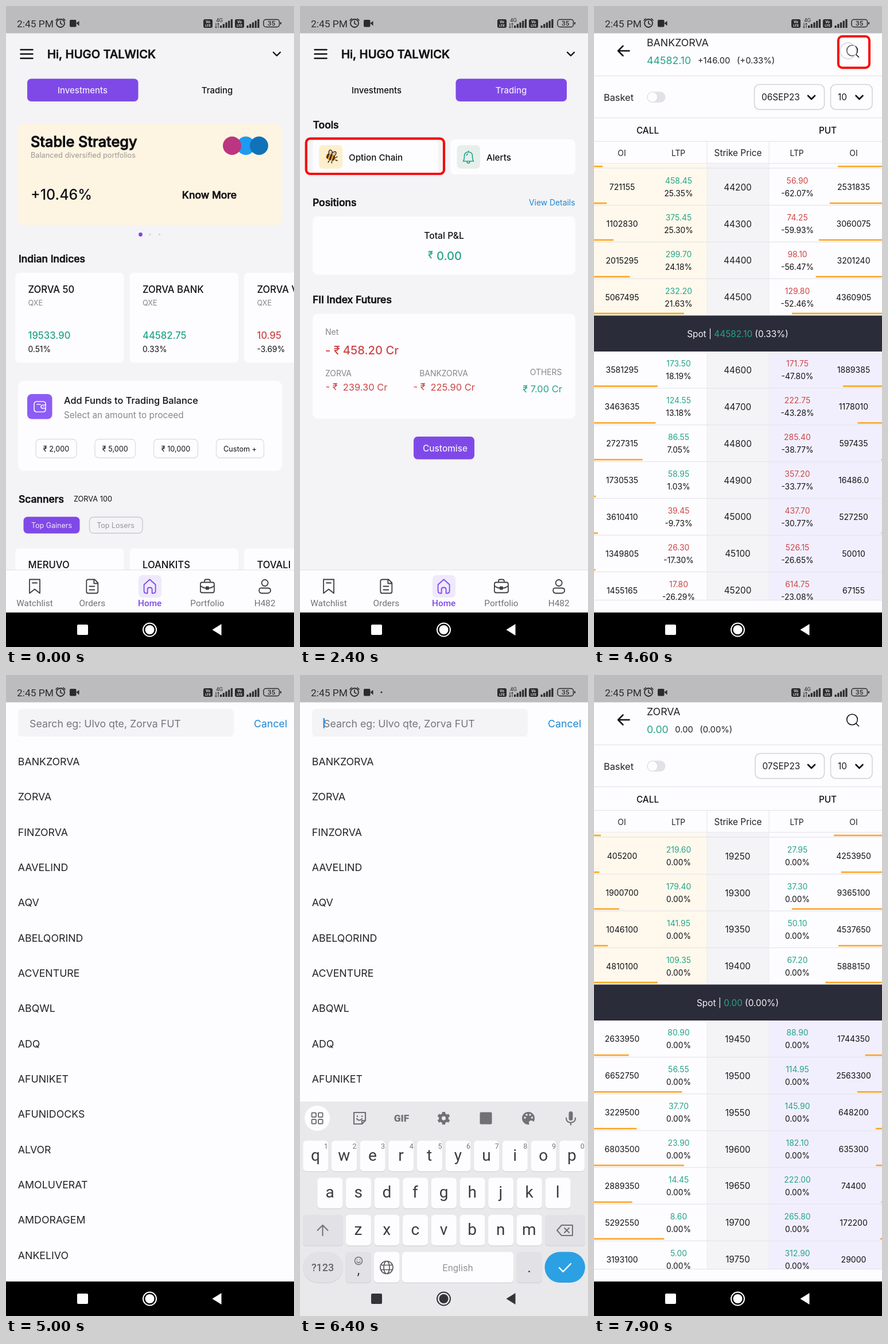
These frames come from a looping animation (502 px wide and 1115 px high, 8 s). An HTML page with a canvas:

```html
<!DOCTYPE html>
<html lang="en">
<head>
<meta charset="utf-8">
<title>Option chain walkthrough</title>
<style>
html, body { margin: 0; width: 100%; height: 100%; overflow: hidden; background: #fdfcfe; }
canvas { display: block; width: 502px; height: 1115px; }
</style>
</head>
<body>
<canvas id="stage"></canvas>
<script>
const W = 502, H = 1115, LOOP = 8000, STEP = 100;
const cv = document.getElementById('stage');
const g = cv.getContext('2d');
const dpr = window.devicePixelRatio || 1;
cv.width = W * dpr;
cv.height = H * dpr;

const SP = 1.278;
const INTER = 'Inter, sans-serif', ROBOTO = 'Roboto, sans-serif';
const INK = '#111114', PAPER = '#fdfcfe', MIST = '#f4f3f6', GREY = '#87868b';
const PURPLE = '#7f49e8', GREEN = '#25a388', RED = '#cd4646', BLUE = '#1b88d4';
const ALERT = '#f50a0a', LINE = '#e5e4e9', AMBER = '#fba622';

// ---------- helpers ----------
// y is the middle of the capitals; weight 'b' thickens the medium face
function text(s, x, y, size, color = INK, align = 'left', weight = 400, face = INTER) {
  const px = size * SP;
  g.font = `${weight === 'b' ? 500 : weight} ${px}px ${face}`;
  g.textAlign = align;
  g.fillStyle = color;
  g.fillText(s, x, y + px * 0.364);
  if (weight === 'b') {
    g.strokeStyle = color;
    g.lineWidth = px * 0.035;
    g.strokeText(s, x, y + px * 0.364);
  }
}
function rect(x0, y0, x1, y1, fill) {
  g.fillStyle = fill;
  g.fillRect(x0, y0, x1 - x0, y1 - y0);
}
function box(x0, y0, x1, y1, r, fill, stroke, lw = 1.3) {
  g.beginPath();
  g.roundRect(x0, y0, x1 - x0, y1 - y0, r);
  if (fill) { g.fillStyle = fill; g.fill(); }
  if (stroke) { g.strokeStyle = stroke; g.lineWidth = lw; g.stroke(); }
}
function disc(x, y, r, fill, stroke, lw = 1.5) {
  g.beginPath();
  g.arc(x, y, r, 0, Math.PI * 2);
  if (fill) { g.fillStyle = fill; g.fill(); }
  if (stroke) { g.strokeStyle = stroke; g.lineWidth = lw; g.stroke(); }
}
function icon(d, x, y, color, lw = 2, fill = false) {
  g.save();
  g.translate(x, y);
  g.lineCap = g.lineJoin = 'round';
  g.strokeStyle = g.fillStyle = color;
  g.lineWidth = lw;
  const p = new Path2D(d);
  if (fill) g.fill(p); else g.stroke(p);
  g.restore();
}
function clipped(x0, y0, x1, y1, draw) {
  g.save();
  g.beginPath();
  g.rect(x0, y0, x1 - x0, y1 - y0);
  g.clip();
  draw();
  g.restore();
}
const hline = y => rect(0, y - 0.6, W, y + 0.6, LINE);
const clamp = u => Math.min(1, Math.max(0, u));
const smooth = u => u * u * (3 - 2 * u);

// ---------- system bars ----------
function volte(x) {
  box(x, 23, x + 16, 38, 3, '#2b2b2d');
  text('Vo', x + 8, 27.5, 5, '#ddd', 'center', 700, ROBOTO);
  text('LTE', x + 8, 34, 4.7, '#ddd', 'center', 700, ROBOTO);
}
function signal(x, n) {
  for (let i = 0; i < n; i++) {
    const h = 4 + i * 11 / (n - 1);
    rect(x + i * 4.7, 38 - h, x + i * 4.7 + 3.2, 38, '#2b2b2d');
  }
}
function statusBar(t) {
  rect(0, 0, W, 47.5, '#bcbbbd');
  const c = '#2b2b2d';
  text('2:45 PM', 19, 30.5, 13.6, c, 'left', 400, ROBOTO);
  disc(95, 30, 7, null, c, 1.8);
  icon('M0-4V0.500L3 2M-8-5L-5-8M8-5L5-8', 95, 30, c, 1.7);
  box(111, 24, 122.5, 36.5, 2, c);
  icon('M0 0L5-4V4.500Z', 122.5, 30, c, 1, true);
  if (t >= 5900 && t < 7500) disc(142, 30, 1.5, c);
  volte(344);
  text('4G', 372, 25, 7.4, c, 'center', 400, ROBOTO);
  icon('M0-5V3M-1.500 1.500L0 3 1.500 1.500M4 3V-5M2.500-3.500L4-5 5.500-3.500', 366, 35, c, 1);
  signal(373, 5);
  volte(399);
  signal(419.5, 5);
  box(449, 23.5, 476.5, 36.5, 4, null, c, 1.5);
  box(478, 28, 480, 32, 1, c);
  text('35', 462.8, 30, 9.2, c, 'center', 500, ROBOTO);
}
function navIcons(color) {
  box(124, 1076, 143, 1094, 2, color);
  disc(250.5, 1085, 11.5, null, color, 2);
  disc(250.5, 1085, 8, color);
  icon('M0 0L16-10V10Z', 359.5, 1085, color, 1, true);
}
function navBar() {
  rect(0, 1055, W, H, '#000');
  navIcons('#fff');
}

// ---------- home ----------
const TABS = [
  ['Watchlist', 'M-9-12H9V12L0 5-9 12ZM-4-6H4'],
  ['Orders', 'M-6-12H4L10-6V9Q10 12 7 12H-7Q-10 12-10 9V-9Q-10-12-6-12ZM3-12V-5H10M-5 0H4M-5 6H4'],
  ['Home', 'M-10-3L0-12 10-3V8Q10 12 6 12H4V5Q4 2 0 2T-4 5V12H-6Q-10 12-10 8Z'],
  ['Portfolio', 'M-9-7H9Q12-7 12-4V8Q12 11 9 11H-9Q-12 11-12 8V-4Q-12-7-9-7ZM-5-7V-9Q-5-12-2-12H2Q5-12 5-9V-7M-12-1Q-7 3-3 3H3Q7 3 12-1M-2 1H2V5H-2Z'],
  ['H482', 'M-5.500-6a5.500 5.500 0 1 0 11 0a5.500 5.500 0 1 0-11 0M-5 3H5Q10 3 10 7T5 12H-5Q-10 12-10 7T-5 3Z']
];
function tabBar() {
  rect(0, 981, W, 1055, PAPER);
  hline(981);
  box(231, 990, 271, 1029, 7, '#efe9fc');
  TABS.forEach(([name, d], i) => {
    const x = 50 + i * 100.3, on = i === 2;
    icon(d, x, 1009.5, on ? PURPLE : '#3e3e42', 1.8);
    text(name, x, 1038, 12, on ? PURPLE : '#727176', 'center', on ? 500 : 400, ROBOTO);
  });
}
function homeTop(trading) {
  rect(0, 47, W, 1055, MIST);
  icon('M1-7.500H22M1 0H22M1 7.500H22', 24.5, 83.5, INK, 2.5);
  text('Hi, HUGO TALWICK', 72, 84, 15.8, INK, 'left', 'b');
  icon('M-6-3L0 3 6-3', 472, 83.5, INK, 2.4);
  const x = trading ? 271.5 : 37;
  box(x, 126.5, x + 193.5, 166, 7, PURPLE);
  text('Investments', 133.5, 147, 11.7, trading ? INK : '#f1eafd', 'center', 500);
  text('Trading', 368, 147, 11.7, trading ? '#f1eafd' : INK, 'center', 500);
}
function indexCard(i, name, value, pct) {
  const x = 16 + i * 199.5;
  box(x, 464, x + 189.5, 620.5, 7, PAPER);
  text(name, x + 22.5, 492.5, 13, INK, 'left', 500);
  text('QXE', x + 22.5, 516, 10, GREY);
  text(value, x + 22.5, 573, 13, pct[0] === '-' ? RED : GREEN, 'left', 500);
  text(pct, x + 22.5, 596.5, 10.8);
}
function investments() {
  homeTop(false);
  box(21, 204, 481.5, 381, 11, '#fef4e2');
  text('Stable Strategy', 43, 235.5, 19.8, '#0c0c0e', 'left', 'b');
  text('Balanced diversified portfolios', 43, 259, 10, '#9b9793');
  disc(418, 243, 16, '#1d9bf0');
  disc(441, 243, 16, '#1072b8');
  disc(394, 243, 16, '#bb3680');
  text('+10.46%', 43, 328, 19.6, INK, 'left', 500);
  text('Know More', 354.5, 329, 13.7, INK, 'center', 'b');
  disc(234.5, 397.5, 3.4, PURPLE);
  disc(251, 397.5, 1.8, '#d9d0ef');
  disc(267.5, 397.5, 1.8, '#d9d0ef');
  text('Indian Indices', 22, 440, 13.7, INK, 'left', 'b');
  indexCard(0, 'ZORVA 50', '19533.90', '0.51%');
  indexCard(1, 'ZORVA BANK', '44582.75', '0.33%');
  indexCard(2, 'ZORVA VOL', '10.95', '-3.69%');

  box(21, 652, 481.5, 808.5, 11, PAPER);
  box(37, 675, 80.5, 718.5, 8, '#8c5cf5');
  icon('M-5-9H5Q10-9 10-5V-3H6Q2-3 2 0T6 3H10V5Q10 9 5 9H-5Q-10 9-10 4V-4Q-10-9-5-9ZM-5-4H1M10-3V3M6 0H7', 59, 697, '#f6f0ff', 1.7);
  text('Add Funds to Trading Balance', 101, 686, 12.8, INK, 'left', 500);
  text('Select an amount to proceed', 101, 711, 12, GREY);
  [[52, 123, '₹ 2,000'], [155, 225.5, '₹ 5,000'], [257.5, 334.5, '₹ 10,000'], [366.5, 449.5, 'Custom +']].forEach(([a, b, s]) => {
    box(a, 753.5, b, 786, 7, null, '#dedde2');
    text(s, (a + b) / 2, 770.5, 9.9, INK, 'center');
  });

  text('Scanners', 22, 857.5, 13.7, INK, 'left', 'b');
  text('ZORVA 100', 118, 857, 10);
  box(30.5, 888.5, 128.5, 917.5, 7, PURPLE);
  text('Top Gainers', 79.5, 903.5, 9.8, '#f1eafd', 'center');
  box(145.5, 889, 238, 917, 7, null, '#cac9ce');
  text('Top Losers', 191, 903.5, 9.8, '#96959a', 'center');
  ['MERUVO', 'LOANKITS', 'TOVALI'].forEach((s, i) => {
    const x = 16 + i * 199.5;
    box(x, 943.5, x + 189.5, 1040, 7, PAPER);
    text(s, x + 22.5, 971.5, 13, INK, 'left', 500);
  });
  tabBar();
}
function bee(x, y) {
  g.save();
  g.translate(x, y);
  g.rotate(0.35);
  for (const [dx, a] of [[-3, -0.5], [3, 0.4]]) {
    g.beginPath();
    g.ellipse(dx, -6, 3.2, 5, a, 0, 7);
    g.fillStyle = '#d8c7b4';
    g.fill();
    g.strokeStyle = '#33241c';
    g.lineWidth = 1.3;
    g.stroke();
  }
  g.beginPath();
  g.ellipse(0, 1, 9, 5.5, 0, 0, 7);
  g.fillStyle = '#eda02b';
  g.fill();
  g.clip();
  for (const dx of [-7, -1.5, 4]) rect(dx, -6, dx + 2.8, 8, '#33241c');
  g.restore();
  icon('M-3 7L-5 10M2 8L1 11M8 2L11 0M8 6L11 7', x, y, '#33241c', 1.4);
}
// minus and currency sign start at x0, the amount ends at x1
function loss(amount, x0, x1, y, size, weight) {
  text('- ₹', x0, y - 0.5, size, RED, 'left', weight);
  text(amount, x1, y, size, RED, 'right', weight);
}
function trading(t) {
  homeTop(true);
  text('Tools', 22.5, 206.5, 13.7, INK, 'left', 'b');
  box(22, 232, 241, 293, 8, PAPER);
  box(262, 232, 480, 293, 8, PAPER);
  box(33, 242, 74, 283, 7, '#feefcc');
  bee(54, 262);
  text('Option Chain', 85, 263, 11.9, INK, 'left', 500);
  box(273.5, 242, 314, 283, 7, '#e7efeb');
  icon('M-9 7Q-7 4-7-2Q-7-9 0-9T7-2Q7 4 9 7ZM-2.500 7Q-2.500 10.500 0 10.500T2.500 7M0-9V-11M-3-3Q-3-5-1-6', 293.5, 263, GREEN, 1.6);
  text('Alerts', 325, 263, 11.9, INK, 'left', 500);
  if (t >= 2000) box(10.7, 230.7, 251, 292, 7, null, ALERT, 4.2);

  text('Positions', 22, 341.5, 13.7, INK, 'left', 'b');
  text('View Details', 479.5, 341.5, 10.85, BLUE, 'right');
  box(22, 366, 480, 467.5, 9, PAPER);
  text('Total P&L', 251, 399.5, 12.3, INK, 'center', 500);
  text('₹', 223, 433, 13, GREEN, 'left', 500);
  text('0.00', 238, 434.5, 15.8, GREEN, 'left', 500);

  text('FII Index Futures', 22, 511, 13.7, INK, 'left', 'b');
  box(22, 535.5, 480, 718, 9, PAPER);
  text('Net', 44, 567, 11, GREY);
  loss('458.20 Cr', 44, 172, 599, 15.8, 500);
  text('ZORVA', 44, 639, 10.9, GREY);
  loss('239.30 Cr', 44.5, 152.5, 662.5, 12.9, 400);
  text('BANKZORVA', 250.5, 639, 10.9, GREY, 'center');
  loss('225.90 Cr', 197.5, 305, 662.5, 12.9, 400);
  text('OTHERS', 456.5, 636.5, 10.9, GREY, 'right');
  text('₹ 7.00 Cr', 457, 665.5, 12.9, GREEN, 'right');
  box(198, 749, 304, 788.5, 7, PURPLE);
  text('Customise', 253, 769, 12, '#f4effd', 'center', 500);
  tabBar();
}

// ---------- option chain ----------
// per row: call OI, call price, call %, put price, put %, put OI
const rows = s => s.trim().split('\n').map(r => r.trim().split(' '));
const BANK = {
  name: 'BANKZORVA', date: '06SEP23', spot: '44582.10', move: '+146.00', pct: '0.33%', sign: '+',
  first: 44200, gap: 100, stub: [15, 77], weak: [7, 6],
  rows: rows(`721155 458.45 25.35 56.90 -62.07 2531835
    1102830 375.45 25.30 74.25 -59.93 3060075
    2015295 299.70 24.18 98.10 -56.47 3201240
    5067495 232.20 21.63 129.80 -52.46 4360905
    3581295 173.50 18.19 171.75 -47.80 1889385
    3463635 124.55 13.18 222.75 -43.28 1178010
    2727315 86.55 7.05 285.40 -38.77 597435
    1730535 58.95 1.03 357.20 -33.77 16486.0
    3610410 39.45 -9.73 437.70 -30.77 527250
    1349805 26.30 -17.30 526.15 -26.65 50010
    1455165 17.80 -26.29 614.75 -23.08 67155`)
};
const MAIN = {
  name: 'ZORVA', date: '07SEP23', spot: '0.00', move: '0.00', pct: '0.00%', sign: '',
  first: 19250, gap: 50, stub: [12, 84], weak: [99, 99],
  rows: rows(`405200 219.60 0.00 27.95 0.00 4253950
    1900700 179.40 0.00 37.30 0.00 9365100
    1046100 141.95 0.00 50.10 0.00 4537650
    4810100 109.35 0.00 67.20 0.00 5888150
    2633950 80.90 0.00 88.90 0.00 1744350
    6652750 56.55 0.00 114.95 0.00 2563300
    3229500 37.70 0.00 145.90 0.00 648200
    6803500 23.90 0.00 182.10 0.00 635300
    2889350 14.45 0.00 222.00 0.00 74400
    5292550 8.60 0.00 265.80 0.00 172200
    3193100 5.00 0.00 312.90 0.00 29000`)
};
function quote(x, y, price, pct) {
  text(price, x, y - 11, 10.9, pct < 0 ? RED : GREEN, 'center');
  text(pct + '%', x, y + 11, 10.8, INK, 'center');
}
// runs of [string, colour] laid out one after another around x
function runs(parts, x, y, size) {
  g.font = `400 ${size * SP}px ${INTER}`;
  const w = parts.map(p => g.measureText(p[0]).width);
  x -= w.reduce((a, b) => a + b) / 2;
  parts.forEach(([s, c], i) => { text(s, x, y, size, c); x += w[i]; });
}
function bars(y, left, right) {
  rect(0, y - 1.3, left, y + 1.3, AMBER);
  rect(W - right, y - 1.3, W, y + 1.3, AMBER);
}
function table(d) {
  const top = i => Math.max(...d.rows.map(r => +r[i]));
  const kCall = 157 / top(0), kPut = 157 / top(5);
  rect(0, 274, 197, 538, '#fef9ec');
  rect(305, 601, W, 1033, '#f1effd');
  rect(197, 274, 305, 1033, MIST);
  rect(196.5, 274, 197.5, 1033, '#ecebef');
  rect(304.5, 274, 305.5, 1033, '#ecebef');
  bars(279, ...d.stub);
  hline(282);
  d.rows.forEach((r, i) => {
    const y = i < 4 ? 315 + i * 63.95 : 633.3 + (i - 4) * 63.9;
    text(r[0], 49, y, 11, INK, 'center');
    quote(147.5, y, r[1], r[2]);
    text(d.first + i * d.gap, 250.5, y, 12, '#1d1d21', 'center');
    quote(354.5, y, r[3], r[4]);
    text(r[5], 452.5, y, 11, INK, 'center');
    hline(y + 31.5);
    bars(y + 28, r[0] * kCall * (i < d.weak[0] ? 1 : 0.06), r[5] * kPut * (i < d.weak[1] ? 1 : 0.06));
  });
  rect(0, 538.5, W, 601, '#2b2c39');
  runs([['Spot | ', '#f3f3f6'], [d.spot, GREEN], [` (${d.pct})`, '#f3f3f6']], 250.5, 570.5, 12);
}
function spinner(t) {
  const u = (((t - 3400) / 1333 + 0.5) % 1 + 1) % 1;
  const head = smooth(clamp(u * 2)), tail = smooth(clamp(u * 2 - 1));
  const full = Math.PI * 1.56, turn = Math.PI * 0.22 + (u - 0.5) * Math.PI;
  g.beginPath();
  g.arc(251, 654, 23.5, turn + tail * full, turn + head * full + 0.05);
  g.strokeStyle = '#2094ee';
  g.lineWidth = 5;
  g.lineCap = 'butt';
  g.stroke();
}
function picker(x0, x1, s) {
  box(x0, 136.5, x1, 180, 9, null, '#d2d1d6', 1.5);
  text(s, x0 + 12.5, 158.8, 12, '#1d1d21');
  icon('M-6-3L0 3 6-3', x1 - 22.5, 159, INK, 2.6);
}
function chain(d, t, loaded, live) {
  rect(0, 47, W, 1055, PAPER);
  icon('M10 0H-9M-1-8.500L-9.500 0-1 8.500', 51.5, 78, INK, 2.5);
  text(d.name, 92, 63.5, 13.9, '#222226');
  const [price, move] = d === BANK && !live ? ['44582.85', '+146.75'] : [d.spot, d.move];
  text(price, 92, 95, 13.9, GREEN);
  const x = 92 + g.measureText(price).width + 11.5;
  text(move, x, 95, 11.6, '#222226');
  text(`(${d.sign}${d.pct})`, x + g.measureText(move).width + 11.5, 95, 11.6, '#222226');
  disc(450, 77.5, 9.3, null, INK, 1.6);
  icon('M0 0L4.500 4.500', 457, 84.5, INK, 1.6);
  hline(121.5);
  text('Basket', 17, 159, 12.8, '#222226');
  box(93, 149, 124.5, 168, 9.5, '#e2e1e5');
  disc(102, 158.5, 9, '#fdfcfe', '#dbdadf', 1.2);
  picker(d === BANK ? 279.5 : 281, 401.5, d.date);
  picker(412.5, 485, '10');
  hline(194.5);
  text('CALL', 93.5, 216, 12, INK, 'center', 500);
  text('PUT', 407.5, 216, 12, INK, 'center', 500);
  hline(235.5);
  [['OI', 48.5], ['LTP', 147], ['LTP', 353.5], ['OI', 452.5]].forEach(([s, cx]) => text(s, cx, 256, 10.8, '#222226', 'center'));
  text('Strike Price', 251, 255.5, 12, '#222226', 'center');
  rect(196.5, 236, 197.5, 274, LINE);
  rect(304.5, 236, 305.5, 274, LINE);
  hline(273.8);
  if (loaded) clipped(0, 274, W, 1033, () => table(d));
  else spinner(t);
  hline(1033.5);
}

// ---------- search ----------
const SYMBOLS = 'BANKZORVA ZORVA FINZORVA AAVELIND AQV ABELQORIND ACVENTURE ABQWL ADQ AFUNIKET AFUNIDOCKS ALVOR AMOLUVERAT AMDORAGEM ANKELIVO'.split(' ');
function search(t, dx, bottom) {
  g.save();
  g.translate(dx, 0);
  rect(0, 47, W, H, PAPER);
  box(21, 59, 397, 107, 7, MIST);
  text('Search eg: Ulvo qte, Zorva FUT', 41, 84.5, 13.9, '#77767c');
  if (t >= 5300 && t < 7200 && (t - 5300) % 1000 < 500) rect(40.5, 75, 43, 92.5, '#2c97e0');
  text('Cancel', 432, 84.5, 13.9, BLUE);
  clipped(0, 110, W, bottom, () => SYMBOLS.forEach((s, i) => text(s, 20.8, 150.5 + i * 61.33, 13.9, '#222226')));
  g.restore();
}
function key(x0, x1, y, fill = '#fdfcfe', r = 6) {
  box(x0, y + 1, x1, y + 54.5, r, '#d3d2d6');
  box(x0, y, x1, y + 53.3, r, fill);
}
function letters(s, x, y, hints) {
  [...s].forEach((c, i) => {
    const cx = x + i * 49.65;
    key(cx - 22, cx + 22, y);
    g.font = `400 28px ${ROBOTO}`;
    g.textAlign = 'center';
    g.fillStyle = '#3c3c40';
    g.fillText(c, cx - 0.3, y + 34.8);
    if (hints) text((i + 1) % 10, cx + 18, y + 9.8, 9.8, '#77767b', 'center', 400, ROBOTO);
  });
}
function gear(x, y, c) {
  for (let i = 0; i < 6; i++) {
    g.save();
    g.translate(x, y);
    g.rotate(i * Math.PI / 3);
    rect(-2.7, -11, 2.7, -5, c);
    g.restore();
  }
  disc(x, y, 6, null, c, 5);
}
function keyboard(dy, tools) {
  const c = '#727176', pale = '#e2e1e5';
  g.save();
  g.translate(0, dy);
  rect(0, 742, W, H, '#e9e8eb');
  disc(30, 771, 22, '#fdfcfe');
  for (const x of [20.5, 32]) for (const y of [761.5, 773]) box(x, y, x + 7.5, y + 7.5, 1.5, null, c, 2);
  if (tools) {
    icon('M-10-10H10V4L4 10H-10ZM4 10V4H10M-5 1Q-1 6 4 1M-4-4V-3M4-4V-3', 104, 771, c, 2.2);
    text('GIF', 177, 771, 13.5, c, 'center', 900, ROBOTO);
    gear(250.5, 771, c);
    box(313.5, 760.5, 334.5, 781.5, 2, c);
    disc(398, 771, 11, c);
    for (const [x, y] of [[392, 770], [395, 765], [401, 765], [404.5, 770]]) disc(x, y, 1.8, '#e9e8eb');
    disc(403, 779, 4, '#e9e8eb');
  }
  box(468.5, 759, 475.5, 775, 3.5, c);
  icon('M-8 0Q-8 8 0 8T8 0M0 8V12', 472, 770.5, c, 2.2);
  letters('qwertyuiop', 27.3, 810, true);
  letters('asdfghjkl', 52.3, 874.5);
  key(5, 75, 939, pale);
  icon('M0 9V-9M-9 0L0-9 9 0', 39.5, 966, c, 2);
  letters('zxcvbnm', 101.8, 939);
  key(427, 497, 939, pale);
  icon('M-14 0L-6-9H13V9H-6ZM-1-4L7 4M7-4L-1 4', 462, 966, c, 2);
  key(5, 75, 1003.5, pale, 27);
  text('?123', 39.5, 1030.5, 14, '#65646a', 'center', 500, ROBOTO);
  key(79.5, 124, 1003.5, pale);
  disc(102, 1019, 6.5, null, c, 1.5);
  icon('M-3 1.500Q0 5 3 1.500M-2.500-2V-1.500M2.500-2V-1.500', 102, 1019, c, 1.5);
  text(',', 102, 1034, 19, '#3c3c40', 'center', 400, ROBOTO);
  key(129, 173.5, 1003.5);
  icon('M-11 0a11 11 0 1 0 22 0a11 11 0 1 0-22 0M-5 0a5 11 0 1 0 10 0a5 11 0 1 0-10 0M-10-4H10M-10 4H10', 151, 1030.5, '#5a595e', 1.7);
  key(178, 372, 1003.5);
  text('English', 275, 1031, 12.9, '#96959a', 'center', 400, ROBOTO);
  key(377, 422, 1003.5, pale);
  text('.', 399.5, 1030, 20, '#3c3c40', 'center', 400, ROBOTO);
  box(426.5, 1003.5, 497, 1057, 27, '#2ba0e3');
  icon('M-10 0L-3.500 7 10-7', 462, 1031, '#fff', 2.4);
  g.restore();
}

// ---------- timeline ----------
const kbUp = t => smooth(clamp((t - 5000) / 300)) - smooth(clamp((t - 7150) / 244));
const slideIn = (t, from) => W * Math.pow(1 - clamp((t - from) / 300), 1.75);
const slideOut = (t, from) => W * Math.pow(clamp((t - from) / 300), 1.75);

function touch(x, y, a) {
  g.globalAlpha = a;
  disc(x, y, 14, 'rgba(255,255,255,.35)', '#dcdae6', 2);
  g.globalAlpha = 1;
}
function chainPage(t) {
  const second = t >= 7100;
  chain(second ? MAIN : BANK, t, second ? t >= 7700 : t >= 3800, t >= 3800);
  if (!second && t >= 3300) box(425.8, 52.8, 480, 107.5, 7, null, ALERT, 4);
  if (t >= 4500 && t < 4700) touch(443, 78, 0.9);
}
function draw(t) {
  g.setTransform(dpr, 0, 0, dpr, 0, 0);
  g.textBaseline = 'alphabetic';
  const kb = kbUp(t);
  if (t < 1400) investments();
  else if (t < 3200) trading(t);
  if (t >= 2800) {
    g.save();
    g.translate(slideIn(t, 2800), 0);
    chainPage(t);
    g.restore();
  }
  if (t >= 4700 && t < 7500) {
    const dx = t < 7200 ? slideIn(t, 4700) : slideOut(t, 7200);
    search(t, dx, Math.min(1055, H - 373 * kbUp(t - 18)));
    if (t >= 7100 && t < 7400) touch(66, 222, t < 7300 ? 1 : 0.7);
  }
  if (kb > 0) {
    keyboard(373 * (1 - kb), t >= 5200 && t < 7200);
    navIcons(t < 7250 ? '#343438' : '#f7f6f9');
  } else navBar();
  statusBar(t);
}
const begin = performance.now();
function tick() {
  const t = (performance.now() - begin) % LOOP;
  draw(Math.floor(t / STEP) * STEP);
  requestAnimationFrame(tick);
}
tick();
</script>
</body>
</html>
```
